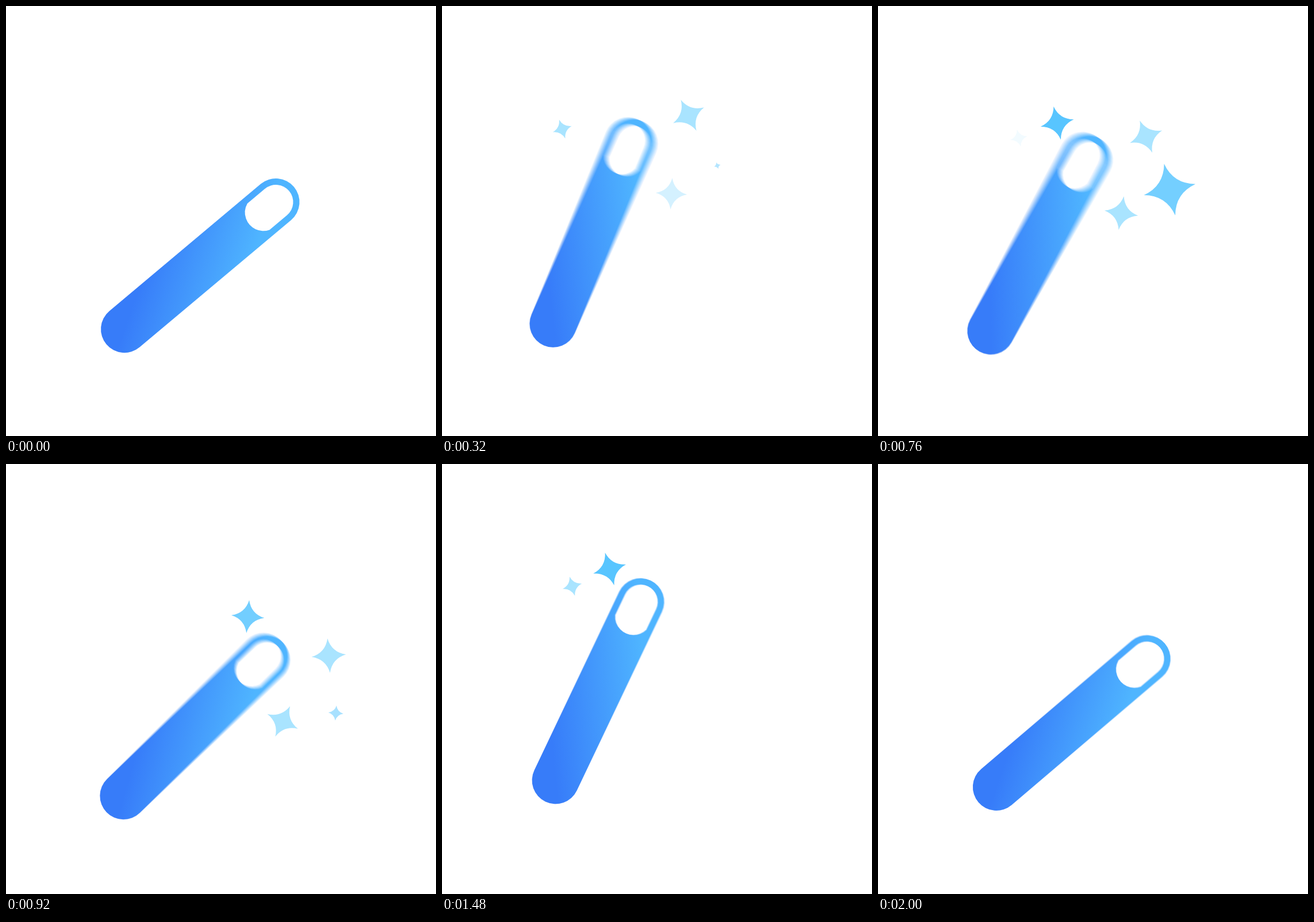
Write an HTML page with a canvas that moves like this. It is 748 px wide and 748 px high and loops after 2.04 s.

```html
<!DOCTYPE html>
<html lang="en">
<head>
<meta charset="utf-8">
<title>Magic wand</title>
<style>
  html, body { margin: 0; width: 100%; height: 100%; overflow: hidden; background: #fff; }
  canvas { display: block; width: 748px; height: 748px; }
</style>
</head>
<body>
<canvas id="stage" width="748" height="748"></canvas>
<script>
const SIZE = 748, LOOP = 2040, STEP = 40;
const SHUTTER = 20, SAMPLES = 16;
const FADE = 160;
const RAD = Math.PI / 180;

const ctx = document.getElementById('stage').getContext('2d');
const layer = document.createElement('canvas');
layer.width = layer.height = SIZE;
const lctx = layer.getContext('2d');

// The pivot lies just below the handle; the wand axis points up from it
const PIVOT_X = 180, PIVOT_Y = 584;
const HANDLE = 34, LENGTH = 344, RADIUS = 41;

const DEEP = '#58c5ff', LIGHT = '#a9e4ff';

// Eases from 0 to 1 after `from`, and back to 0 before `to`
function bump(t, from, to, rise = FADE, fall = rise) {
  const p = Math.max(0, Math.min(1, (t - from) / rise, (to - t) / fall));
  return p * p * (3 - 2 * p);
}

// Stars ride on the wand: distance and bearing from the pivot, tilt, radius
const STARS = [
  { dist: 413, bearing: -10.2, tilt: -41, r: 29.5, color: DEEP,
    show: t => bump(t, 400, 1040) + bump(t, 1300, 1840) },
  { dist: 371, bearing: -18.7, tilt: -41, r: 17.3, color: LIGHT,
    show: t => bump(t, 140, 800) + bump(t, 1060, 1840) },
  { dist: 466, bearing: 9.1, tilt: -50, r: 30, color: LIGHT,
    show: t => bump(t, 70, 1340) },
  { dist: 338, bearing: 17.2, tilt: -20, r: 29.5, color: LIGHT,
    show: t => bump(t, 240, 1160) },
  { dist: 428, bearing: 21.1, tilt: -41, r: 64.5, color: DEEP, grows: true,
    show: t => bump(t, 265, 1050, 295, 450) }
];

// A wide swing, a dip, then a narrower swing
function pose(c, t) {
  const wide = bump(t, 0, 1020, 520, 500);
  const narrow = bump(t, 1020, LOOP, 500, 520);
  const dip = bump(t, 520, 1320, 400);
  c.translate(PIVOT_X + 3 * narrow, PIVOT_Y + 17 * dip - 3 * narrow);
  c.rotate((50 - 40 * wide - 25 * narrow) * RAD);
}

const tint = lctx.createLinearGradient(0, 0, 147, -88);
tint.addColorStop(0, '#377cf9');
tint.addColorStop(1, '#4fb5ff');

function drawWand(c, t) {
  c.fillStyle = '#fff';
  c.fillRect(0, 0, SIZE, SIZE);
  c.save();
  pose(c, t);
  c.translate(0, -HANDLE);

  c.fillStyle = tint;
  c.beginPath();
  c.arc(0, -LENGTH, RADIUS, Math.PI, 0);
  c.arc(0, 0, RADIUS, 0, Math.PI);
  c.fill();

  // Window: round top, straight sides, slightly flatter bottom
  const bend = Math.acos(30 / 32);
  c.fillStyle = '#fff';
  c.beginPath();
  c.arc(0, -LENGTH, 30, Math.PI, 0);
  c.arc(0, -LENGTH + 28.5, 32, bend, Math.PI - bend);
  c.fill();
  c.restore();
}

function starPath(c, r) {
  c.beginPath();
  c.moveTo(r, 0);
  for (let i = 1; i <= 4; i++) {
    const tip = i * Math.PI / 2, waist = tip - Math.PI / 4;
    c.quadraticCurveTo(0.26 * r * Math.cos(waist), 0.26 * r * Math.sin(waist),
                       r * Math.cos(tip), r * Math.sin(tip));
  }
}

function drawStar(s, t) {
  const p = s.show(t);
  if (p <= 0) return;
  ctx.save();
  pose(ctx, t);
  ctx.rotate(s.bearing * RAD);
  ctx.translate(0, -s.dist);
  ctx.rotate((s.tilt - s.bearing) * RAD);
  ctx.globalAlpha = s.grows ? 0.4 + 0.6 * p : p;
  ctx.fillStyle = s.color;
  starPath(ctx, s.r * (s.grows ? p : 0.85 + 0.15 * p));
  ctx.fill();
  ctx.restore();
}

function render(t) {
  // Motion blur: running average of the poses while the shutter is open
  for (let i = 0; i < SAMPLES; i++) {
    drawWand(lctx, t + SHUTTER * ((i + 0.5) / SAMPLES - 0.5));
    ctx.globalAlpha = 1 / (i + 1);
    ctx.drawImage(layer, 0, 0);
  }
  ctx.globalAlpha = 1;
  STARS.forEach(s => drawStar(s, t));
}

const start = performance.now();
let last = -1;

function tick() {
  const now = Math.max(0, performance.now() - start) % LOOP;
  const t = Math.floor(now / STEP) * STEP;
  if (t !== last) render(last = t);
  requestAnimationFrame(tick);
}
tick();
</script>
</body>
</html>
```
